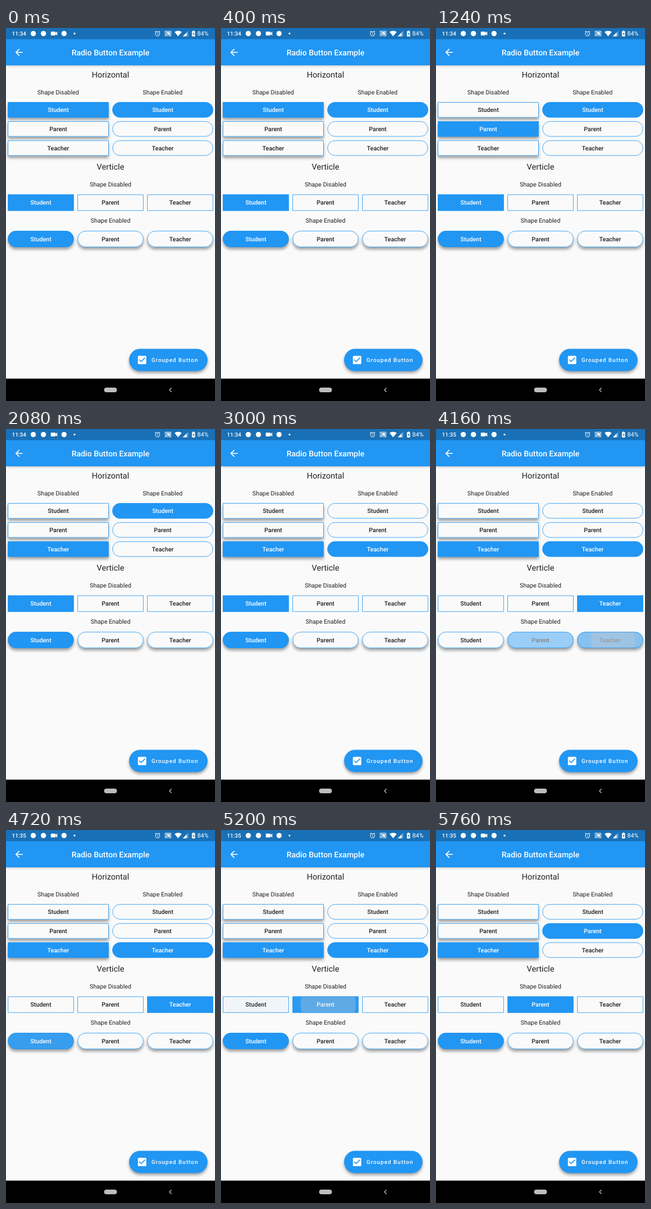
These frames come from a looping animation (360 by 640 pixels, 6400 ms). An HTML page:

```html
<!DOCTYPE html>
<html lang="en">
<head>
<meta charset="utf-8">
<title>Radio Button Example</title>
<style>
html, body { margin: 0; width: 100%; height: 100%; overflow: hidden; background: #fafafa; }
svg { display: block; font-family: Roboto, sans-serif; text-rendering: geometricPrecision; }
.title { font-size: 13.6px; font-weight: 500; fill: #fff; }
.head { font-size: 14px; fill: #212121; }
.sub { font-size: 10.4px; fill: #212121; }
.label { font-size: 10.4px; font-weight: 500; }
.fab { font-size: 9.6px; font-weight: 500; letter-spacing: .96px; }
.clock { font-size: 9.6px; font-weight: 500; }
.battery { font-size: 10.4px; }
.shade { filter: blur(2.8px); fill: #000; opacity: .36; }
.glow { fill: #bcbcbc; }
.splash { fill: #c8c8c8; }
.outline { fill: none; stroke: #2196f3; stroke-width: .8px; }
</style>
</head>
<body>
<svg id="stage" width="360" height="640" viewBox="0 0 360 640">
  <rect width="360" height="640" fill="#fafafa"/>
  <rect class="shade" y="20" width="360" height="44"/>
  <rect y="19" width="360" height="45" fill="#2196f3"/>
  <rect width="360" height="19.2" fill="#1970b6"/>
  <rect y="601.6" width="360" height="38.4"/>
  <rect class="shade" x="212" y="553.6" width="135.2" height="38.4" rx="19.2"/>
  <rect x="212" y="550.4" width="135.2" height="38.4" rx="19.2" fill="#2196f3"/>
  <g fill="#fff">
    <text class="fab" x="250.5" y="573">Grouped Button</text>
    <text class="clock" id="clock" x="10.3" y="13">11:34</text>
    <text class="battery" x="329.5" y="13.2">84%</text>
    <circle cx="47" cy="9.5" r="4.5"/>
    <circle cx="64.5" cy="9.5" r="4.5"/>
    <path d="M78 6.3h6.5q.8 0 .8.8v1.5l3-2.6v7l-3-2.6v1.5q0 .8-.8.8h-6.5q-.8 0-.8-.8v-4.8q0-.8.8-.8z"/>
    <circle cx="100" cy="9.5" r="4.5"/>
    <circle cx="118" cy="9.5" r="1.6"/>
    <path transform="translate(255.5 4) scale(.46)" d="M22 5.72l-4.6-3.86-1.29 1.53 4.6 3.86zM7.88 3.39L6.6 1.86 2 5.71l1.29 1.53zM12.5 8H11v6l4.75 2.85.75-1.23-4-2.37zM12 4a9 9 0 0 0 0 18a9 9 0 0 0 0-18zm0 16a7 7 0 0 1 0-14a7 7 0 0 1 0 14z"/>
    <path transform="translate(273 3.5) scale(.5)" d="M21 3H3c-1.1 0-2 .9-2 2v3h2V5h18v14h-7v2h7c1.1 0 2-.9 2-2V5c0-1.1-.9-2-2-2zM1 18v3h3c0-1.66-1.34-3-3-3zm0-4v2c2.76 0 5 2.24 5 5h2c0-3.87-3.13-7-7-7zm0-4v2c4.97 0 9 4.03 9 9h2c0-6.08-4.93-11-11-11zM19 7H5v1.63c3.96 1.28 7.09 4.41 8.37 8.37H19z"/>
    <path d="M296.5 14.3L290.3 6.8Q296.5 2.6 302.7 6.8z"/>
    <path d="M304.5 14.2L314 4.7v9.5z" opacity=".35"/>
    <path d="M304.5 14.2L311 7.7v6.5z"/>
    <path d="M321.8 4.5h2.4v1h1.5v8.9h-5.4V5.5h1.5z"/>
    <path d="M323.5 7.2l-2 3.2h1.3v2.3l2-3.2h-1.3z" fill="#1970b6"/>
    <path transform="translate(12.8 32.2) scale(.8)" d="M20 11H7.83l5.59-5.59L12 4l-8 8 8 8 1.41-1.41L7.83 13H20z"/>
    <path transform="translate(224.8 560) scale(.8)" d="M19 3H5c-1.11 0-2 .9-2 2v14c0 1.1.89 2 2 2h14c1.11 0 2-.9 2-2V5c0-1.1-.89-2-2-2zm-9 14l-5-5 1.41-1.41L10 14.17l7.59-7.59L19 8z"/>
    <rect x="169" y="617" width="22" height="8" rx="4" fill="#bdbdbd"/>
    <path d="M285 617.5l-3.5 3.5 3.5 3.5" fill="none" stroke="#c8c8c8" stroke-width="1.1"/>
  </g>
</svg>
<script>
const LOOP = 6400, STEP = 40, CLOCK_TURN = 3320;
const stage = document.getElementById('stage');
const clock = document.getElementById('clock');
const clamp = v => Math.min(1, Math.max(0, v));
const mix = (a, b, k) => a + (b - a) * k;
const blend = (a, b, k) => `rgb(${a.map((v, i) => Math.round(mix(v, b[i], k)))})`;
const PAPER = [250, 250, 250], BLUE = [33, 150, 243], DARK = [33, 33, 33], WHITE = [255, 255, 255];

function set(el, attrs) {
  for (const name in attrs) el.setAttribute(name, attrs[name]);
  return el;
}

function add(parent, tag, attrs) {
  const el = document.createElementNS('http://www.w3.org/2000/svg', tag);
  parent.append(set(el, attrs));
  return el;
}

// Text centred on a point
function caption(cls, text, x, cy, size) {
  const el = add(stage, 'text', { class: cls, x, y: cy + size * .35, 'text-anchor': 'middle' });
  el.textContent = text;
  return el;
}

caption('title', 'Radio Button Example', 180, 41.8, 13.6);
caption('head', 'Horizontal', 180, 80, 14);
caption('sub', 'Shape Disabled', 89.8, 110, 10.4);
caption('sub', 'Shape Enabled', 269.8, 110, 10.4);
caption('head', 'Verticle', 180, 238.2, 14);
caption('sub', 'Shape Disabled', 180, 268, 10.4);
caption('sub', 'Shape Enabled', 180, 330.2, 10.4);

function group(id, { x, y, dx = 0, dy = 0, w, h, round, raised }) {
  return ['Student', 'Parent', 'Teacher'].map((name, i) => {
    const box = { x: x + i * dx, y: y + i * dy, width: w, height: h, rx: round ? h / 2 : 0 };
    const line = {
      class: 'outline', x: box.x + .4, y: box.y + .4, width: w - .8, height: h - .8,
      rx: round ? h / 2 - .4 : 0
    };
    const cy = box.y + h / 2;
    const clip = `clip-${id}-${i}`;
    add(add(stage, 'clipPath', { id: clip }), 'rect', box);
    if (raised) add(stage, 'rect', { ...box, class: 'shade', y: box.y + 4 });
    const face = add(stage, 'rect', box);
    const ink = add(stage, 'g', { 'clip-path': `url(#${clip})` });
    const glow = add(ink, 'rect', { ...box, class: 'glow' });
    const splash = add(ink, 'circle', { class: 'splash', cx: box.x + w * .54, cy });
    add(stage, 'rect', line);
    const label = caption('label', name, box.x + w / 2, cy, 10.4);
    return { face, ink, glow, splash, label, w };
  });
}

const groups = [
  { x: 3.2, y: 127.2, dy: 32.8, w: 173.6, h: 26.4, raised: true },
  { x: 183.2, y: 127.2, dy: 32.8, w: 173.6, h: 26.4, round: true },
  { x: 3.2, y: 285.6, dx: 120, w: 113.6, h: 28 },
  { x: 3.2, y: 348, dx: 120, w: 113.6, h: 28, round: true, raised: true }
].map((spec, id) => group(id, spec));

// start, duration, group, button
const taps = [
  [950, 290, 0, 1], [1550, 330, 0, 2],
  [2085, 280, 1, 1], [2350, 290, 1, 2],
  [3010, 330, 2, 1], [3390, 370, 2, 2],
  [3720, 300, 3, 1], [4020, 300, 3, 2], [4380, 390, 3, 0],
  [4725, 275, 2, 0], [5030, 290, 2, 1],
  [5550, 210, 1, 1]
];

// Brief highlight under an expanding, fading splash
function drawInk({ ink, glow, splash, w }, u) {
  set(ink, { visibility: u < 1 ? 'visible' : 'hidden' });
  set(glow, { opacity: .4 * Math.min(clamp(u / .15), clamp((.55 - u) / .25)) });
  set(splash, {
    r: (w / 2 + 8) * clamp(u / .8),
    opacity: .33 * Math.min(clamp(u / .1), clamp((1 - u) / .35))
  });
}

function draw(t) {
  clock.textContent = t < CLOCK_TURN ? '11:34' : '11:35';
  groups.forEach((buttons, g) => {
    let on = [1, 0, 0];
    const progress = [1, 1, 1];
    for (const [start, dur, owner, target] of taps) {
      if (owner !== g || t < start) continue;
      const u = clamp((t - start) / dur);
      const k = clamp((u - .3) / .3);
      on = on.map((v, i) => mix(v, i === target ? 1 : 0, k));
      progress[target] = u;
    }
    buttons.forEach((button, i) => {
      set(button.face, { fill: blend(PAPER, BLUE, on[i]) });
      set(button.label, { fill: blend(DARK, WHITE, on[i]) });
      drawInk(button, progress[i]);
    });
  });
}

const begin = performance.now();
function tick() {
  const t = (performance.now() - begin) % LOOP;
  draw(Math.floor(t / STEP) * STEP);
  requestAnimationFrame(tick);
}
tick();
</script>
</body>
</html>
```
